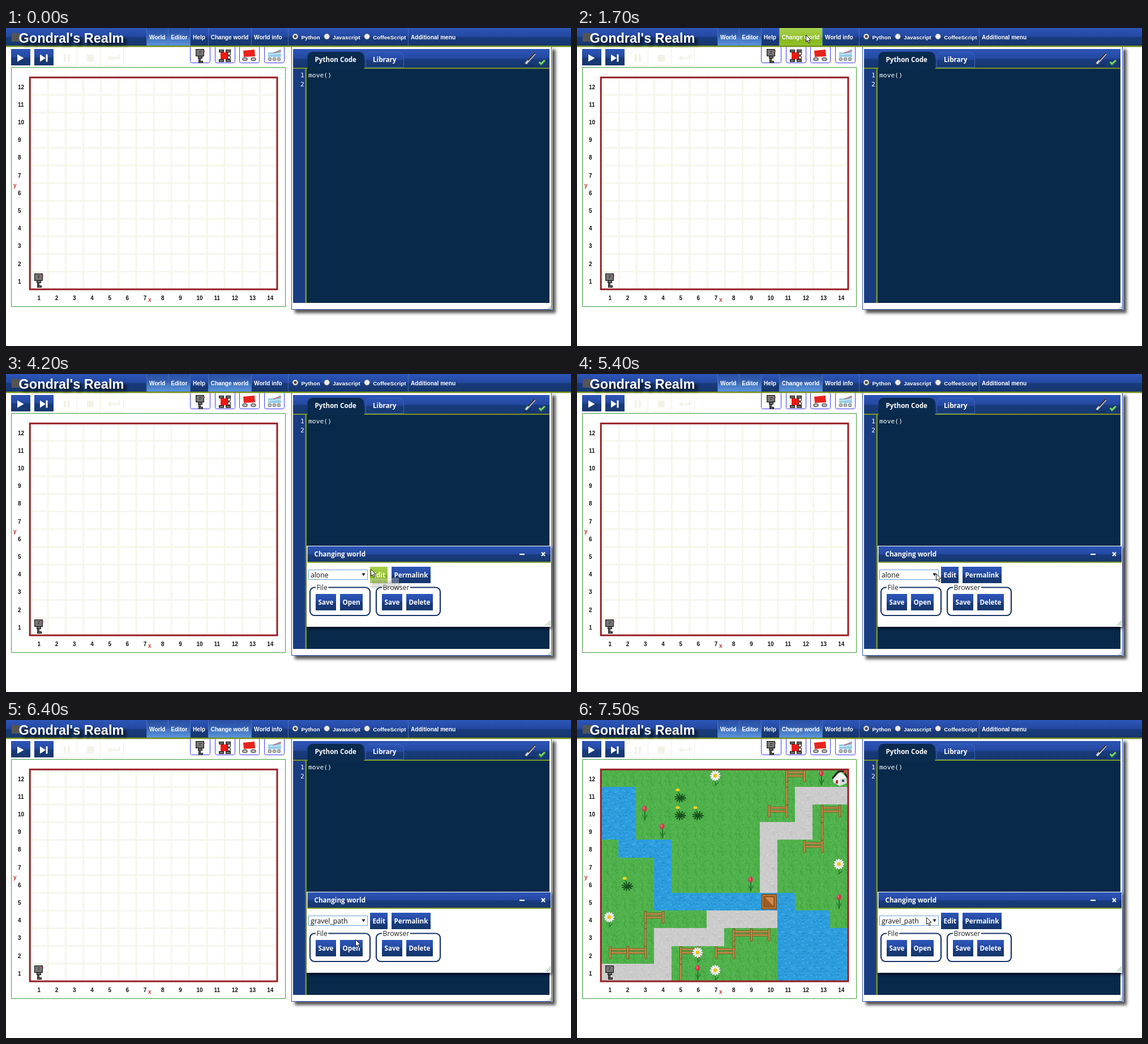
Write an HTML page with a canvas that moves like this. It is 998 px wide and 561 px high and loops after 8000 ms.

```html
<!DOCTYPE html>
<html lang="en">
<head>
<meta charset="utf-8">
<title>Changing world</title>
<style>
html, body { margin: 0; width: 100%; height: 100%; overflow: hidden; background: #fff; }
canvas { display: block; width: 998px; height: 561px; }
</style>
</head>
<body>
<canvas id="stage" width="998" height="561"></canvas>
<script>
const LOOP = 8000, STEP = 100;
const CELL = 31.2, LEFT = 42.9, BOTTOM = 461;
const COLS = 14, ROWS = 12;
const SANS = '"Liberation Sans", Arial, sans-serif';
const UI = 'bold 11.65px "Open Sans", sans-serif';
const BODY = '12.2px "Open Sans", sans-serif';
const CODE = '11.35px "DejaVu Sans Mono", monospace';
const MENU = 'bold 10.1px ' + SANS;
const SMALL = 'bold 10px ' + SANS;
const OLIVE = '#7c9624';
const SKIN = {
  blue: ['#2d56b8', '#2449a2', '#183b7c', '#16376e'],
  active: ['#2a50a8', '#3460b0', '#4072c0', '#5a94dc'],
  green: ['#a8d04c', '#96c432', '#86b61c', '#90c22a']
};
const TAU = 2 * Math.PI;
const stage = document.getElementById('stage');
let g = stage.getContext('2d');

function rect(color, x, y, w, h) { g.fillStyle = color; g.fillRect(x, y, w, h); }
function box(color, x, y, w, h, r = 0, width = 1) {
  g.strokeStyle = color; g.lineWidth = width;
  g.beginPath(); g.roundRect(x, y, w, h, r); g.stroke();
}
function trace(points) {
  g.beginPath();
  for (let i = 0; i < points.length; i += 2) g.lineTo(points[i], points[i + 1]);
}
function poly(color, ...points) { trace(points); g.fillStyle = color; g.fill(); }
function line(color, width, ...points) {
  trace(points); g.strokeStyle = color; g.lineWidth = width; g.stroke();
}
function oval(color, x, y, rx, ry = rx, turn = 0) {
  g.fillStyle = color; g.beginPath(); g.ellipse(x, y, rx, ry, turn, 0, TAU); g.fill();
}
function text(str, x, y, font, color = '#fff') {
  g.font = font; g.fillStyle = color; g.fillText(str, x, y);
}
function widthOf(str, font) { g.font = font; return g.measureText(str).width; }
function gloss(skin, x, y, w, h, radius = 0) {
  const fill = g.createLinearGradient(0, y, 0, y + h);
  [0, .47, .55, 1].forEach((stop, i) => fill.addColorStop(stop, SKIN[skin][i]));
  g.fillStyle = fill; g.beginPath(); g.roundRect(x, y, w, h, radius); g.fill();
}
function withShadow(color, dx, dy, blur, paint) {
  g.save();
  g.shadowColor = color; g.shadowOffsetX = dx; g.shadowOffsetY = dy; g.shadowBlur = blur;
  paint();
  g.restore();
}
function at(x, y, paint) { g.save(); g.translate(x, y); paint(); g.restore(); }
function seeded(seed) {
  return () => (seed = (seed * 16807) % 2147483647) / 2147483647;
}
function inside(p, x, y, w, h) {
  return p && p.x >= x && p.x < x + w && p.y >= y && p.y < y + h;
}

// Columns count from the left and rows from the bottom, both from 1.
const midX = col => LEFT + (col - .5) * CELL;
const midY = row => BOTTOM - (row - .5) * CELL;
const topY = row => BOTTOM - row * CELL;

const GARDEN = [
  '......D.....TH',
  '~~..Y......###',
  '~~T.YY.....#..',
  '~~.T.....###..',
  '.~~~.....#....',
  '...~.....#...D',
  '.Y.~....T#....',
  '...~~~~~~C~..T',
  'D.....####~~~.',
  '...####...~~~~',
  '...#.D....~~~~',
  '####.TD...~~~~'
];

const ground = {
  grass: { base: '#50b24c', specks: ['#419e3e', '#62bf57', '#48a644'], count: 75, dx: .5, dy: 2.5 },
  water: { base: '#2b9ddd', specks: ['#4fb2ea', '#1d88cb', '#3fa8e4'], count: 45, dx: 4, dy: 1 },
  path: { base: '#cbcbcb', specks: ['#dcdcdc', '#bcbcbc', '#d3d1cf'], count: 55, dx: 2, dy: 1.5 }
};
function tile(kind, col, row) {
  const { base, specks, count, dx, dy } = ground[kind], rnd = seeded(3100 + count);
  at(Math.floor(LEFT - .5 + (col - 1) * CELL), Math.round(topY(row)), () => {
    g.beginPath(); g.rect(0, 0, 32, 32); g.clip();
    rect(base, 0, 0, 32, 32);
    for (let i = 0; i < count; i++) {
      const x = rnd() * 31, y = rnd() * 31;
      line(specks[i % 3], 1.2, x, y, x + dx, y + dy);
    }
  });
}

function rail(x, y, w, h) {
  rect('#70461b', x, y, w, h);
  rect('#c68d4a', x + .7, y + .7, w - 1.4, h - 1.4);
}
// Walks from a cell: E lays two rails with posts, N raises one side rail.
function fence(col, row, steps) {
  for (const step of steps) {
    const x = midX(col) - 2, y = topY(row) + 1;
    if (step === 'N') {
      rail(x, y - CELL, 4, CELL);
      row++;
    } else {
      for (const dy of [3, 9]) rail(x + 2, y + dy, CELL, 4);
      for (const dx of [0, CELL]) rail(x + dx, y, 4, 22);
      col++;
    }
  }
}

const props = {
  D() {
    line('#24752a', 1.6, -1.5, 4, -1, 13, 4, 8);
    for (let a = 0; a < TAU; a += TAU / 12) {
      const x = -1.5 + 6 * Math.cos(a), y = -4 + 6 * Math.sin(a);
      oval('#8f968a', x, y, 3.7, 1.9, a);
      oval('#fff', x, y, 3.2, 1.5, a);
    }
    oval('#efc41c', -1.5, -4, 3.2);
  },
  T() {
    line('#1d7527', 2, -1, -4, -1, 13);
    for (const side of [-1, 1]) poly('#22752b', -1, 13, -1 + side * 6, 0, -1 + side * 2, 5);
    oval('#d8304a', -1.5, -8, 4, 5);
    oval('#f0667a', -2.5, -9, 1.5, 3);
  },
  Y() {
    for (let a = 0; a < TAU; a += TAU / 11) {
      line('#164e1c', 2, -1, 4, -1 + 10 * Math.cos(a), 4 + 8 * Math.sin(a));
    }
    line('#276f24', 1.2, -1, 4, -5, -9);
    oval('#f4d420', -5.5, -10, 3.6, 2.4);
  },
  H() {
    poly('#f6f6f4', -12, 0, 2, -11, 12, -1, 12, 9, 0, 14, -11, 8);
    poly('#dcdcda', 0, 2, 12, -1, 12, 9, 0, 14);
    line('#2a2226', 3, -13, 1, -3, -11, 7, -12, 14, 0);
    rect('#b12c2c', -7, 4, 4, 6);
    rect('#38465c', 4, 3, 4, 4);
    rect('#e23b3b', 7, -13, 5, 5);
  },
  C() {
    ['#8a4c18', '#d08238', '#7e4415', '#cf8a4a'].forEach((color, i) => {
      const r = 13.5 - i * 1.8;
      rect(color, -r, -r, 2 * r, 2 * r);
    });
    poly('#9c5a24', -8, -8, 8, 8, -8, 8);
  }
};

function paintGarden() {
  const kinds = { '~': 'water', C: 'water', '#': 'path' };
  const eachCell = visit => GARDEN.forEach((cells, i) =>
    [...cells].forEach((mark, j) => visit(mark, j + 1, ROWS - i)));
  eachCell((mark, col, row) => tile(kinds[mark] || 'grass', col, row));
  fence(1, 2, 'EENNE');
  fence(5, 0, 'NNE');
  fence(7, 2, 'ENEE');
  fence(10, 10, 'ENNE');
  fence(12, 8, 'ENNE');
  eachCell((mark, col, row) => props[mark] && at(midX(col), midY(row), props[mark]));
}
const garden = document.createElement('canvas');
garden.width = 998; garden.height = 561;
g = garden.getContext('2d');
paintGarden();
g = stage.getContext('2d');

function framed(x, y, w, h) {
  rect('#1b1b1b', x, y, w, h);
  rect('#777', x + 1.2, y + 1.2, w - 2.4, h - 2.4);
}
function robot() {
  framed(5, 16, 4, 9);
  framed(5, 21, 8, 4);
  framed(4, 12, 8, 5);
  framed(0, 0, 15, 13);
  rect('#222', 6, 4, 4, 1);
  rect('#222', 6, 7, 3, 1);
  rect('#c62f3f', 14, 3, 2, 2);
}
function rover() {
  for (const x of [1, 13]) {
    framed(x + 2, 2, 4, 18);
    for (const y of [1, 18]) framed(x - 1, y, 9, 5);
  }
  rect('#ee1a12', 3, 6, 14, 12);
  for (const y of [8, 15]) { oval('#333', 18, y, 3.2); oval('#fff', 18, y, 2); }
}
function cart() {
  poly('#e8231c', 0, 3, 20, 1, 21, 13, 1, 14);
  for (const x of [3, 18]) { oval('#666', x, 18, 5, 3.5); oval('#c5c5c5', x, 18, 3, 1.8); }
}
function skate() {
  poly('#92cce8', 0, 6, 11, 6, 22, 0, 23, 14, 0, 14);
  line('#d45c5c', 1.5, 9, 7, 23, 3);
  line('#e8f5fb', 1.2, 0, 10, 23, 8);
  for (let x = 3; x < 24; x += 8) { oval('#8a9aa2', x, 18, 3.4); oval('#e2c8a8', x, 18, 1.6); }
}

const icons = [
  c => poly(c, 11, 9.5, 22.5, 16, 11, 22.5),
  c => { poly(c, 10, 9.5, 20, 16, 10, 22.5); rect(c, 20.5, 9.5, 3, 13); },
  c => { for (const x of [11, 18]) rect(c, x, 10, 4, 12); },
  c => rect(c, 11, 10, 12, 12),
  c => { line(c, 3, 27, 10, 27, 16, 10, 16); poly(c, 6, 16, 13, 11, 13, 21); }
];
function drawToolbar() {
  icons.forEach((icon, i) => at(Math.round(9 + i * 40.9), 37, () => {
    if (i < 2) gloss('blue', 0, 0, 34, 29);
    else line('#f1ede0', 1, 34.5, 0, 34.5, 29.5, 0, 29.5);
    icon(i < 2 ? '#fff' : '#f4f1e6');
  }));
  [robot, rover, cart, skate].forEach((model, i) => at(Math.round(325 + i * 43.7), 31, () => {
    rect('#fff', 0, 0, 36, 31);
    box('#3838f0', .5, .5, 35, 30, 3);
    g.translate(i ? 7 : 10, 6);
    model();
  }));
}

function drawWorld(planted) {
  box('#3c9c3c', 9.5, 69.5, 484, 422);
  if (planted) g.drawImage(garden, 0, 0);
  else {
    for (let i = 1; i < COLS; i++) rect('#f6f6ec', LEFT + i * CELL - 1.5, 87, 3, 374);
    for (let i = 1; i < ROWS; i++) rect('#f6f6ec', 43, topY(i) - 1.5, 436, 3);
  }
  box('#961f24', 42.2, 87.2, 436.8, 373.8, 0, 3);
  for (let c = 1; c <= COLS; c++) text(c, midX(c) - 2.9, 479.5, SMALL, '#111');
  for (let r = 1; r <= ROWS; r++) text(r, 21, midY(r) + 5.4, SMALL, '#111');
  text('x', 251, 483, SMALL, '#c03434');
  text('y', 13, 280.5, SMALL, '#c03434');
  at(50, 433, robot);
}

function grip(x, y, size) {
  for (let i = size; i > 0; i -= 3) line('#78b078', 1, x - i, y, x, y - i);
}
function tab(label, x, w, paint) {
  paint(x, 42, w, [9, 9, 0, 0]);
  text(label, x + 13, 60, UI);
}
function drawEditor() {
  withShadow('rgba(0,0,0,.65)', 6, 6, 5, () => rect('#fff', 504, 32, 461, 465));
  box('#2b50ae', 504.5, 30.5, 459, 466);
  gloss('blue', 507, 37, 453, 34);
  rect('#193c80', 507, 72, 22, 413);
  rect('#08294a', 531, 72, 429, 413);
  rect(OLIVE, 507, 70, 453, 2);
  rect(OLIVE, 528.5, 72, 2.5, 413);
  tab('Python Code', 532.5, 100, (x, y, w, radius) => {
    g.fillStyle = '#0a2a4e';
    g.beginPath(); g.roundRect(x, y, w, 31, radius); g.fill();
  });
  tab('Library', 635, 68, (x, y, w, radius) => {
    gloss('blue', x, y, w, 28, radius);
    box('#3a62ba', x + .5, y + .5, w - 1, 27, radius);
  });
  line('#d0d0d0', 4, 918, 63, 934, 45);
  line('#2c2c32', 2.5, 922, 57, 934, 44);
  line('#122a50', 1.5, 915, 66, 934, 66);
  line('#39903a', 4, 941.5, 60, 945, 64, 952, 57);
  line('#8cdc7a', 2, 942, 60, 945, 63, 951.5, 57);
  text('1', 520, 87, CODE);
  text('2', 520, 102.5, CODE);
  text('move()', 534, 87, CODE);
  grip(963, 496, 6);
}

function drawHeader(pointer, opened) {
  const edge = x => rect('rgba(90,130,205,.65)', Math.round(x), 0, 1, 31);
  gloss('blue', 0, 0, 998, 31);
  let x = 248.6;
  for (const label of ['World', 'Editor', 'Help', 'Change world', 'World info']) {
    const w = widthOf(label, MENU) + 9.7, changer = label === 'Change world';
    const lit = label === 'World' || label === 'Editor' || (changer && opened);
    if (changer && inside(pointer, x, 0, w, 31)) gloss('green', x, 0, w, 31);
    else if (lit) gloss('active', x, 0, w, 31);
    edge(x - .6);
    text(label, x + 4.5, 19.5, MENU);
    x += w;
  }
  x = 511;
  for (const label of ['Python', 'Javascript', 'CoffeeScript']) {
    oval('#8b8b8b', x, 15, 5.2);
    oval('#ededed', x, 15, 4.4);
    if (label === 'Python') oval('#444', x, 15, 2.5);
    text(label, x + 10.5, 20, 'bold 9.8px ' + SANS);
    x += 22.5 + g.measureText(label).width;
  }
  edge(498);
  edge(710);
  text('Additional menu', 715, 19.5, MENU);
  rect('#758f1c', 0, 31, 998, 2.5);
  rect('#555', 10, 9, 15, 15);
  withShadow('rgba(0,0,0,.8)', 5, 5, 5, () =>
    text("Gondral's Realm", 22.5, 26, 'bold 23.5px ' + SANS));
}

// Lays buttons side by side and returns where the row ends.
function buttons(x, y, labels, pointer) {
  for (const label of labels) {
    const w = Math.round(widthOf(label, UI) + 9);
    const over = 'Edit Open'.includes(label) && inside(pointer, x, y, w, 29);
    gloss(over ? 'green' : 'blue', x, y, w, 29);
    text(label, x + 4.5, y + 18.5, UI);
    x += w + 7;
  }
  return x - 7;
}
function group(label, x, labels, pointer) {
  const end = buttons(x + 10, 388, labels, pointer);
  box('#17356b', x, 376.5, end + 13 - x, 49.5, 8, 2.2);
  rect('#fff', x + 10, 374, widthOf(label, BODY) + 3, 5);
  text(label, x + 11.5, 380.5, BODY, '#222');
}
function drawDialog(choice, pointer) {
  withShadow('rgba(0,0,20,.8)', 1, 3, 5, () => rect('#fff', 531, 303, 432, 143));
  gloss('blue', 532.5, 304, 429.5, 28);
  rect(OLIVE, 532.5, 331, 429.5, 2);
  text('Changing world', 544.5, 321.5, UI);
  rect('#fff', 907, 317, 9, 2.2);
  line('#fff', 2, 946, 314.5, 952, 321);
  line('#fff', 2, 952, 314.5, 946, 321);
  box('#6b9fd2', 534.5, 345.5, 104, 17);
  text(choice, 538, 358.5, BODY, '#111');
  poly('#111', 628.5, 351.5, 634.5, 351.5, 631.5, 356.5);
  buttons(643, 340, ['Edit', 'Permalink'], pointer);
  group('File', 537, ['Save', 'Open'], pointer);
  group('Browser', 654, ['Save', 'Delete'], pointer);
  grip(962, 444, 9);
}

const worlds = ['alone', 'gravel_path', 'simple_path', 'slalom', 'storm', 'home',
  'maze', 'harvest', 'hurdle', 'rain', 'tokens'];
function drawList(pointer) {
  rect('#fff', 534, 363, 106, 198);
  box('#7a9cc4', 534.5, 363.5, 105, 210);
  worlds.forEach((name, i) => {
    const y = 364 + i * 18;
    const picked = i === (pointer.y < 382 ? 0 : 1);
    if (picked) rect('#1e90ff', 535, y, 104, 18);
    text(name, 538, y + 13, BODY, picked ? '#fff' : '#111');
  });
}
function drawTooltip(alpha) {
  g.globalAlpha = alpha;
  withShadow('rgba(0,0,0,.5)', 3, 3, 3, () => rect('#fff', 643, 360, 51, 15));
  box('#888', 643.5, 360.5, 50, 14);
  text('Edit world', 647.5, 370.5, '9.3px ' + SANS, '#555');
  g.globalAlpha = 1;
}

const moves = [
  { start: 600, end: 1700, x: 404, y: 12 },
  { start: 3000, end: 3600, x: 644, y: 344 },
  { start: 4800, end: 5400, x: 634, y: 352 },
  { start: 5600, end: 6000, x: 617, y: 387 },
  { start: 6900, end: 7000, x: 620, y: 390 },
  { start: 7000, end: 7300, x: 648, y: 350 },
  { start: 7400, end: 7500, x: 617, y: 348 }
];
function pointerAt(t) {
  if (t < 600) return null;
  let x = 322, y = 530;
  for (const move of moves) {
    const k = Math.min(1, Math.max(0, (t - move.start) / (move.end - move.start)));
    const eased = k * (2 - k);
    x += (move.x - x) * eased;
    y += (move.y - y) * eased;
  }
  return { x: Math.round(x), y: Math.round(y) };
}
function drawPointer({ x, y }) {
  at(x + .5, y + .5, () => {
    trace([0, 0, 0, 12, 2.7, 9.5, 4.7, 14.3, 6.8, 13.4, 4.8, 8.8, 8.5, 8.5]);
    g.closePath();
    g.fillStyle = '#fff'; g.fill();
    g.strokeStyle = '#111'; g.lineWidth = 1; g.stroke();
  });
}

function draw(t) {
  const pointer = pointerAt(t);
  const opened = t >= 2800;
  rect('#fff', 0, 0, 998, 561);
  drawWorld(t >= 6500);
  drawToolbar();
  drawEditor();
  drawHeader(pointer, opened);
  if (opened) drawDialog(t < 6400 ? 'alone' : 'gravel_path', pointer);
  if (t >= 5500 && t < 6400) drawList(pointer);
  if (t >= 4200 && t < 4900) drawTooltip(Math.min(1, .3 + (t - 4200) / 285));
  if (pointer) drawPointer(pointer);
}

let shown = -1;
const began = performance.now();
function tick() {
  const t = Math.floor(((performance.now() - began) % LOOP) / STEP) * STEP;
  if (t !== shown) draw(shown = t);
  requestAnimationFrame(tick);
}
tick();
</script>
</body>
</html>
```
